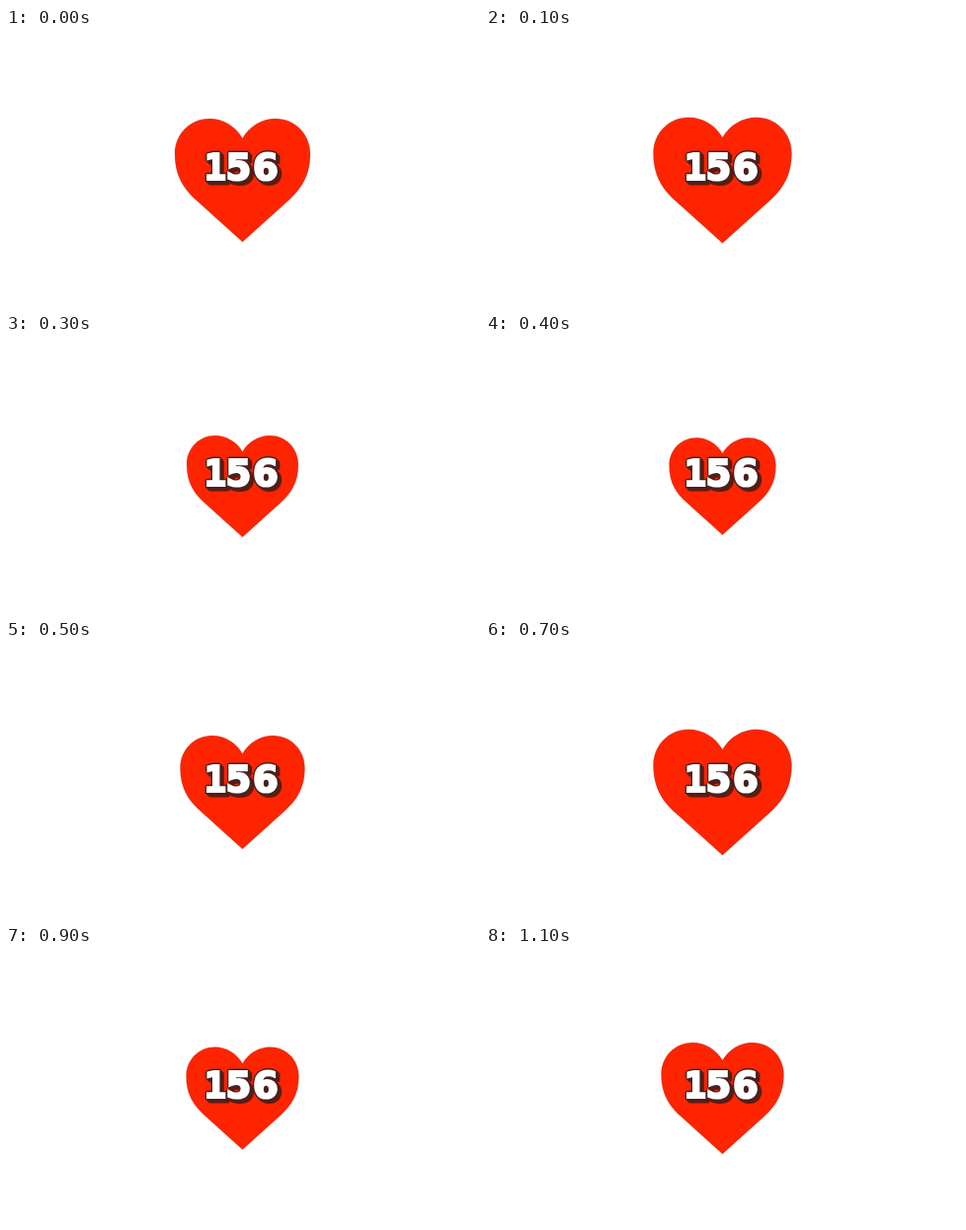
An HTML page that plays this animation: 480 by 282 pixels, repeating every 1.2 s.

```html
<!DOCTYPE html>
<html lang="en">
<head>
<meta charset="utf-8">
<title>Beating heart</title>
<style>
  html, body { margin: 0; width: 100%; height: 100%; overflow: hidden; background: #fff; }
  svg { display: block; width: 480px; height: 282px; }
  text { font: bold 37px "DejaVu Sans", sans-serif; }
  .slab { font-family: "DejaVu Sans Mono", monospace; }
  #heart { fill: #ff2400; stroke: #5a3c3c; stroke-width: .4; stroke-opacity: .5; }
  #depth { fill: #5a1d17; stroke: #5a1d17; stroke-width: 5; stroke-linejoin: round; }
  #rim { stroke: #45221f; }
  #face { fill: #fff; stroke: #fff; stroke-width: 2.2; }
</style>
</head>
<body>
<svg viewBox="0 0 480 282">
  <defs>
    <text id="count" x="200.7 222.6 250" y="153.6"><tspan class="slab">1</tspan>56</text>
  </defs>
  <path id="heart" d="M0-42.5C-7-55-20-62.5-33.5-62.5C-53-62.5-68.5-47-68.5-27
    C-68.5-4-59 9-47 20L0 62.5L47 20C59 9 68.5-4 68.5-27
    C68.5-47 53-62.5 33.5-62.5C20-62.5 7-55 0-42.5Z"/>
  <g id="depth">
    <use href="#count" x="3" y="3"/>
    <use href="#count" x="2" y="2"/>
    <use href="#count" x="1" y="1"/>
    <use id="rim" href="#count"/>
  </g>
  <use id="face" href="#count"/>
</svg>
<script>
  const heart = document.getElementById('heart');
  const STEP = 100;
  // Heart width in pixels at each step of two beats
  const widths = [137, 140, 127, 113, 108, 126, 138, 140, 127, 114, 108, 124];
  const start = performance.now();

  function draw(now) {
    const step = Math.floor(Math.max(0, now - start) / STEP) % widths.length;
    heart.setAttribute('transform', `translate(239.5 154.5) scale(${widths[step] / 137})`);
    requestAnimationFrame(draw);
  }
  draw(start);
</script>
</body>
</html>
```
